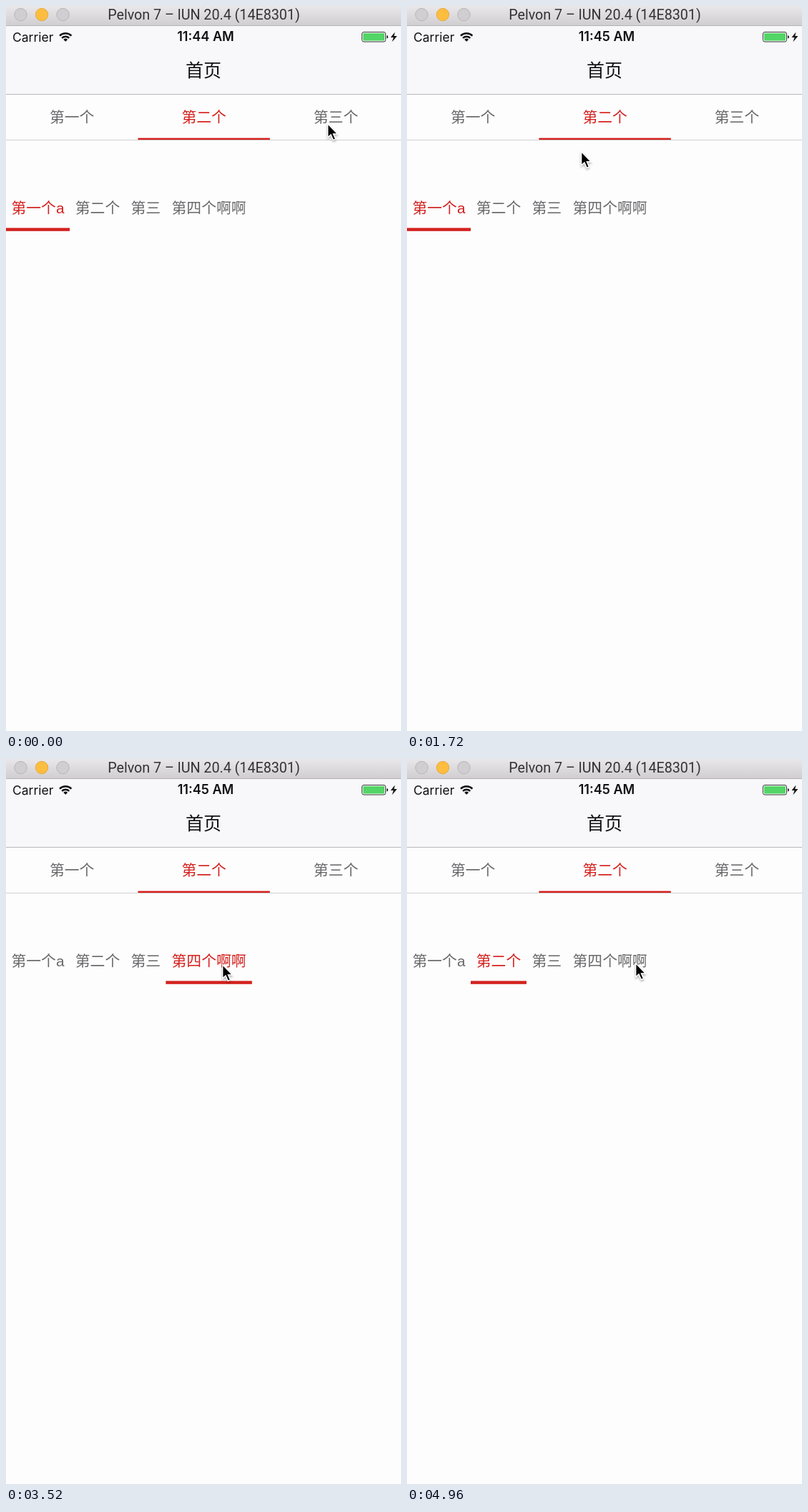
These frames come from a looping animation (552x1014 px, 5040 ms). An HTML page:

```html
<!DOCTYPE html>
<html lang="zh">
<head>
<meta charset="utf-8">
<style>
html, body { margin: 0; width: 100%; height: 100%; overflow: hidden; background: #fefdfe; }
svg { display: block; width: 552px; height: 1014px; }
text { font-family: Inter, "Noto Sans CJK SC", "Noto Sans CJK", sans-serif; }
.mid { text-anchor: middle; }
.tab { font: 350 20.8px "Liberation Sans", "Noto Sans CJK SC", "Noto Sans CJK", sans-serif; }
</style>
</head>
<body>
<svg viewBox="0 0 552 1014">
  <defs>
    <linearGradient id="bar" x2="0" y2="1">
      <stop stop-color="#e9e7ea"/><stop offset="1" stop-color="#d0ced1"/>
    </linearGradient>
    <filter id="shadow" x="-50%" y="-50%" width="200%" height="200%">
      <feDropShadow dx="0" dy="2" stdDeviation="1.5" flood-opacity=".35"/>
    </filter>
  </defs>
  <rect width="552" height="1014" fill="#fefdfe"/>

  <rect y="27" width="552" height="96" fill="#f8f7fa"/>
  <rect y="123" width="552" height="1" fill="#b9b8bb"/>
  <rect width="552" height="27" fill="url(#bar)"/>
  <rect y="27" width="552" height="1" fill="#b5b3b6"/>
  <g fill="#d0ced1" stroke="#b7b5b8">
    <circle cx="20.5" cy="12" r="8.7"/>
    <circle cx="50" cy="12" r="8.7" fill="#fdbd3f" stroke="#e5ab40"/>
    <circle cx="79.5" cy="12" r="8.7"/>
  </g>
  <text class="mid" x="276.5" y="19.3" font-size="19.7" fill="#333234" style="font-family:Roboto,sans-serif">Pelvon 7 – lUN 20.4 (14E8301)</text>

  <text x="9" y="49.5" font-size="17.5" fill="#111">Carrier</text>
  <g fill="none" stroke="#111" stroke-width="2.4">
    <path d="M75 41.6a11.6 11.6 0 0 1 16.4 0M78.1 44.8a7.2 7.2 0 0 1 10.2 0"/>
    <path d="M83.2 49.8l-2.9-2.9a4.1 4.1 0 0 1 5.8 0z" fill="#111" stroke="none"/>
  </g>
  <text id="clock" class="mid" x="279" y="49.3" font-size="18.1" font-weight="600" fill="#111"></text>
  <rect x="497.5" y="36.5" width="33" height="13.5" rx="2.5" fill="#fff" stroke="#333"/>
  <rect x="499" y="38" width="30" height="10.5" rx="1" fill="#53d567"/>
  <path d="M532 41q2 .5 2 2.3t-2 2.3z" fill="#222"/>
  <path d="M543.5 36.5l-6 7.6h4l-2 6.2 7-8.2h-4.2z" fill="#111"/>

  <text class="mid" x="276" y="99.3" font-size="25" font-weight="500" fill="#111">首页</text>
  <rect y="187" width="552" height="1" fill="#cfced1"/>
  <g id="tabs"></g>
  <path id="cursor" filter="url(#shadow)" stroke="#fff" stroke-width="1.3"
    d="M.7 .8V19.8L5 15.900L8.300 23.400L11.500 22L8.300 14.800H14.200Z"/>
</svg>
<script>
const LOOP = 5040, SLIDE = 250, RED = '#d3211d', GRAY = '#69696b';
const $ = id => document.getElementById(id);
const smooth = p => { p = Math.min(1, Math.max(0, p)); return p * p * (3 - 2 * p); };
const mix = (a, b, p) => a + (b - a) * p;

function make(tag, attrs, text = '') {
  const el = document.createElementNS('http://www.w3.org/2000/svg', tag);
  for (const key in attrs) el.setAttribute(key, attrs[key]);
  el.textContent = text;
  return $('tabs').appendChild(el);
}

// clicks: [press time, release time, tab index]
const groups = [
  { labels: ['第一个', '第二个', '第三个'], x: [0, 184.4, 368.8], w: [184.4, 184.4, 184.4],
    textY: 163, lineY: 184.6, lineH: 2.5, start: 1,
    clicks: [[100, 180, 2], [640, 730, 0], [1130, 1199, 1]] },
  { labels: ['第一个a', '第二个', '第三', '第四个啊啊'], x: [0, 89, 167, 223.3], w: [89, 78, 56.5, 120.5],
    textY: 290, lineY: 310.4, lineH: 4.4, start: 0,
    clicks: [[2300, 2370, 1], [2740, 2820, 2], [3180, 3250, 3], [3860, 3930, 0], [4400, 4478, 1]] }
];
for (const g of groups) {
  g.texts = g.labels.map((s, i) =>
    make('text', { class: 'tab mid', x: g.x[i] + g.w[i] / 2, y: g.textY }, s));
  g.line = make('rect', { y: g.lineY, height: g.lineH, fill: RED });
}

// pointer stops: [arrive, leave, x, y]
const stops = [
  [0, 260, 449, 164], [620, 800, 142, 171], [1090, 1500, 287, 171],
  [2140, 2440, 127, 287], [2680, 2900, 192, 287], [3130, 3560, 302, 287],
  [3820, 4080, 46, 295], [4360, 4600, 146, 287], [4920, LOOP, 319, 285]
];

function pointer(t) {
  const i = stops.findLastIndex(s => s[0] <= t), [, leave, x, y] = stops[i];
  if (t <= leave) return [x, y];
  const next = stops[i + 1], p = smooth((t - leave) / (next[0] - leave));
  return [mix(x, next[2], p), mix(y, next[3], p)];
}

function drawGroup(g, t) {
  let current = g.start, pressed = -1, x = g.x[current];
  for (const [down, up, i] of g.clicks) {
    if (t >= up) {
      x = mix(x, g.x[i], smooth((t - up) / SLIDE));
      current = i;
    } else if (t >= down) pressed = i;
  }
  g.line.setAttribute('x', x);
  g.line.setAttribute('width', g.w[current]);
  g.texts.forEach((el, i) => el.setAttribute('fill', i === current || i === pressed ? RED : GRAY));
}

function draw(now) {
  const t = now % LOOP;
  $('clock').textContent = t < 280 ? '11:44 AM' : '11:45 AM';
  groups.forEach(g => drawGroup(g, t));
  $('cursor').setAttribute('transform', `translate(${pointer(t)})`);
}

const begin = performance.now();
function tick() {
  draw(performance.now() - begin);
  requestAnimationFrame(tick);
}
tick();
</script>
</body>
</html>
```
